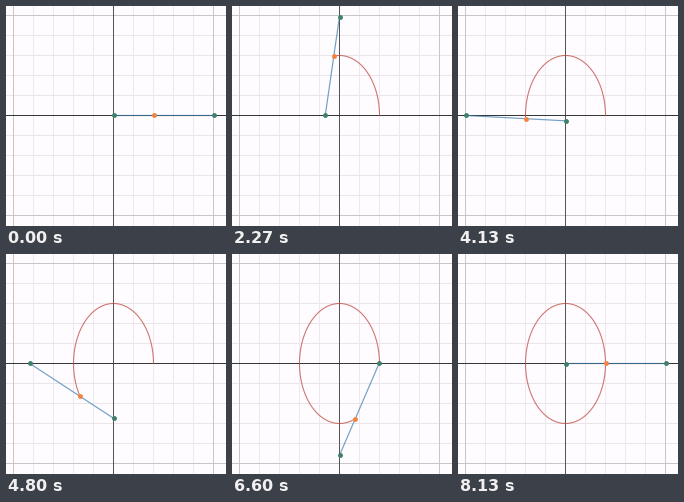
Write a matplotlib script that moves like this. It is 220 px wide and 220 px high and loops after 8.99 s.

```python
import numpy as np
import matplotlib.pyplot as plt
from matplotlib.animation import FuncAnimation

SIZE, DPI = 220, 100
PX = 72 / DPI                 # one pixel in points
CX, CY, UNIT = 107.5, 109.5, 20
ROD, A, B = 5 * UNIT, 2 * UNIT, 3 * UNIT

INTERVAL, FRAMES = 31, 290
STEP_MS, LAST_STEP = 66.64, 122

# rod angle in degrees at given steps, with three short stalls
KEY_STEPS = [0, 1, 5, 6, 13, 20, 21, 22, 34, 52, 72, 99, 101, 102, 122]
KEY_ANGLES = [0, 0.8, 11.6, 11.6, 33.8, 55.1, 55.1, 61.5, 98.2,
              152.9, 213.2, 293.3, 299.4, 299.4, 360]

BLUE, RED, ORANGE, GREEN = "#3a7aac", "#bf4a42", "#f28340", "#3f7f6c"

fig = plt.figure(figsize=(SIZE / DPI, SIZE / DPI), dpi=DPI, facecolor="#fefcfe")
ax = fig.add_axes([0, 0, 1, 1])
ax.set_xlim(0, SIZE)
ax.set_ylim(SIZE, 0)
ax.axis("off")


def grid(indices, x_color, y_color, z):
    style = dict(lw=PX, zorder=z, snap=False)
    for k in indices:
        ax.axvline(CX + k * UNIT, color=x_color, **style)
        ax.axhline(CY + k * UNIT, color=y_color, **style)


grid(range(-5, 6), "#efe8ef", "#e9e5e9", 0)
grid((-5, 5), "#c8c6c8", "#c8c6c8", 1)
grid((0,), "#555555", "#363636", 2)


def dots(color, size):
    return ax.scatter([], [], s=(size * PX) ** 2, color=color,
                      linewidths=0, zorder=5, snap=False)


trace, = ax.plot([], [], color=RED, lw=1.1 * PX, alpha=0.75, zorder=3, snap=False)
rod, = ax.plot([], [], color=BLUE, lw=1.2 * PX, alpha=0.7, zorder=4, snap=False)
ends = dots(GREEN, 4.9)
pen = dots(ORANGE, 4.9)


def ellipse(t, a, b):
    return CX + a * np.cos(t), CY - b * np.sin(t)


def update(i):
    step = min(int((i + 1) * INTERVAL / STEP_MS), LAST_STEP)
    angle = np.radians(np.interp(step, KEY_STEPS, KEY_ANGLES))
    x, y = ellipse(angle, ROD, ROD)
    rod.set_data([x, CX], [CY, y])
    ends.set_offsets([(x, CY), (CX, y)])
    pen.set_offsets([ellipse(angle, A, B)])
    trace.set_data(*ellipse(np.linspace(0, angle, 2 + step * 2), A, B))
    return trace, rod, ends, pen


anim = FuncAnimation(fig, update, frames=FRAMES, interval=INTERVAL,
                     init_func=lambda: update(0), repeat=True, repeat_delay=0)
plt.show()
```
